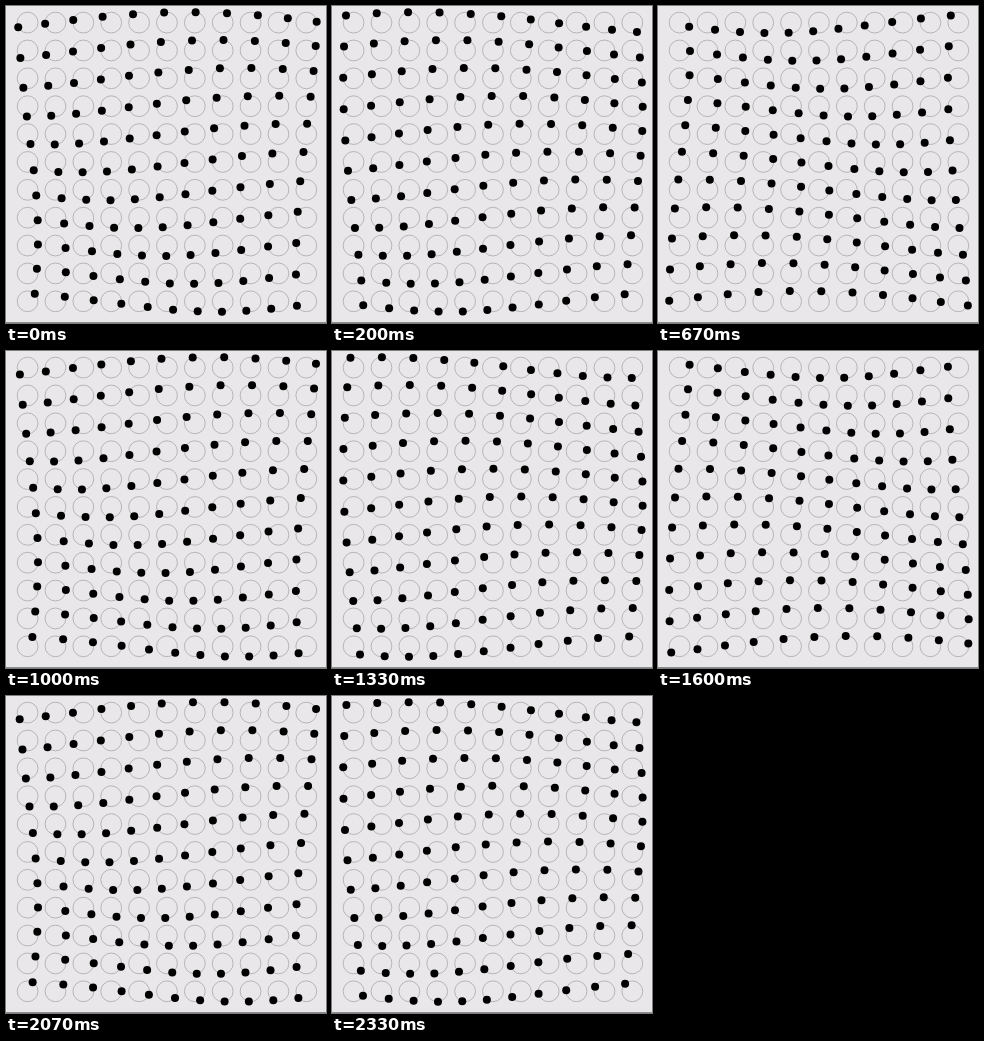
These frames come from a looping animation (320x317 px, 2390 ms). An HTML page with a canvas:

```html
<!DOCTYPE html>
<html lang="en">
<head>
<meta charset="utf-8">
<title>Phase-shifted dots</title>
<style>
  html, body { margin: 0; width: 100%; height: 100%; overflow: hidden; background: #e9e7ea; }
  canvas { display: block; width: 320px; height: 317px; }
</style>
</head>
<body>
<canvas id="stage" width="320" height="317"></canvas>
<script>
const ctx = document.getElementById('stage').getContext('2d');
const LOOP = 2390, FPS = 15;
const COUNT = 11, GAP = 27.87, LEFT = 21.6, TOP = 16.6;
const ORBIT = 10.4, DOT = 4, SHIFT = 0.35;

function circle(x, y, r) {
  ctx.beginPath();
  ctx.arc(x, y, r, 0, Math.PI * 2);
}

// Steps fall on multiples of 1/15 s, rounded to 10 ms.
const stepAt = ms => Math.floor((Math.floor(ms / 10) * 10 + 5) * FPS / 1000);

// Steady rotation that slows slightly near the end of the loop.
const phaseAt = step => 2.69 + 0.4 * step - 0.022 * Math.max(0, step - 27);

function draw(ms) {
  const phase = phaseAt(stepAt(ms % LOOP));
  ctx.fillStyle = '#e9e7ea';
  ctx.fillRect(0, 0, 320, 317);
  ctx.fillStyle = '#8c8b8d';
  ctx.fillRect(0, 316, 320, 1);
  ctx.fillStyle = '#000';
  ctx.strokeStyle = '#a9a8aa';
  ctx.lineWidth = 0.8;
  for (let row = 0; row < COUNT; row++) {
    for (let col = 0; col < COUNT; col++) {
      const x = LEFT + col * GAP, y = TOP + row * GAP;
      const angle = phase + (col - row) * SHIFT;
      circle(x, y, ORBIT);
      ctx.stroke();
      circle(x + ORBIT * Math.cos(angle), y + ORBIT * Math.sin(angle), DOT);
      ctx.fill();
    }
  }
}

const start = performance.now();
function tick() {
  draw(performance.now() - start);
  requestAnimationFrame(tick);
}
tick();
</script>
</body>
</html>
```
